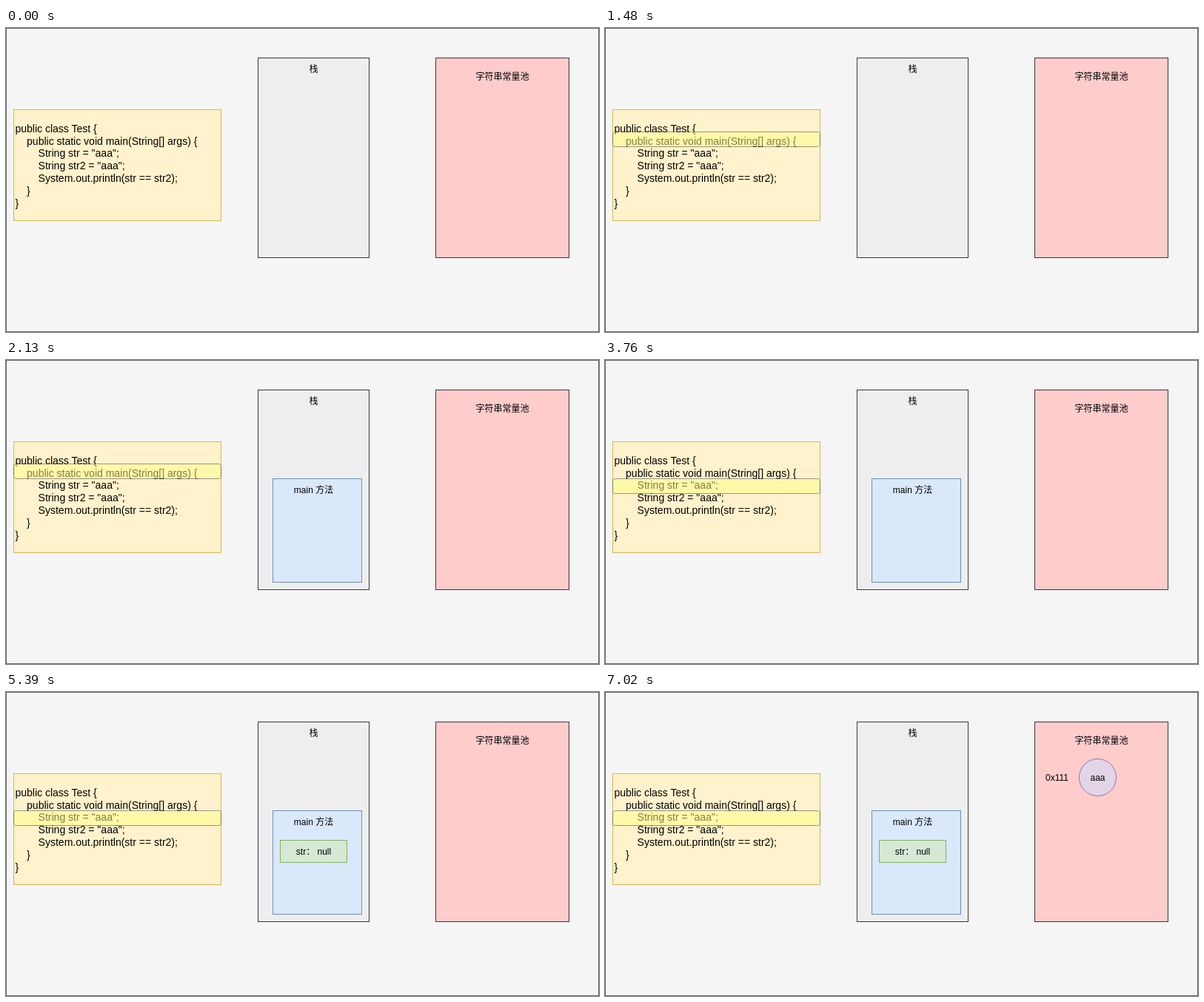
Write an HTML page that moves like this. It is 801 px wide and 411 px high and loops after 8 s.

```html
<!DOCTYPE html>
<html lang="zh-CN">
<head>
<meta charset="utf-8">
<style>
html, body { margin: 0; width: 100%; height: 100%; overflow: hidden; background: #f5f5f5; }
svg { display: block; }
text { font: 12px "Liberation Sans", Arial, "Noto Sans CJK SC", "Noto Sans CJK", sans-serif; text-anchor: middle; }
#code text { font-size: 14px; text-anchor: start; white-space: pre; }
</style>
</head>
<body>
<svg width="801" height="411">
  <rect x=".5" y=".5" width="800" height="410" fill="#f5f5f5" stroke="#666"/>
  <rect x="340.5" y="40.5" width="150" height="270" fill="#eee" stroke="#36393d"/>
  <text x="415.5" y="60">栈</text>
  <rect x="580.5" y="40.5" width="180" height="270" fill="#fcc" stroke="#36393d"/>
  <text x="670.5" y="70">字符串常量池</text>
  <rect x="10.5" y="110.5" width="280" height="150" fill="#fff2cc" stroke="#d6b656"/>
  <g id="code"></g>
  <rect id="marker" x="10.5" width="280" height="20" rx="3" fill="#ff8" stroke="#36393d" opacity=".5"/>
  <g id="method">
    <rect x="360.5" y="160.5" width="120" height="140" fill="#dae8fc" stroke="#6c8ebf"/>
    <text x="415.5" y="180">main 方法</text>
  </g>
  <g id="variable">
    <rect x="370.5" y="200.5" width="90" height="30" fill="#d5e8d4" stroke="#82b366"/>
    <text x="415.5" y="220">str： null</text>
  </g>
  <g id="pooled">
    <text x="610.5" y="120">0x111</text>
    <circle cx="665.5" cy="115.5" r="25" fill="#e1d5e7" stroke="#9673a6"/>
    <text x="665.5" y="120">aaa</text>
  </g>
</svg>
<script>
const LOOP = 8000, START = 500, STEP = 1630;
const $ = id => document.getElementById(id);

const lines = [
  'public class Test {',
  '    public static void main(String[] args) {',
  '        String str = "aaa";',
  '        String str2 = "aaa";',
  '        System.out.println(str == str2);',
  '    }',
  '}'
];
lines.forEach((line, i) => {
  const t = document.createElementNS('http://www.w3.org/2000/svg', 'text');
  t.setAttribute('x', 12.5);
  t.setAttribute('y', Math.floor(141.2 + 16.8 * i));
  t.textContent = line;
  $('code').append(t);
});

const show = (id, on) => $(id).style.display = on ? '' : 'none';

function draw(now) {
  const step = Math.floor((now % LOOP - START) / STEP); // -1 before the first step
  show('marker', step >= 0);
  $('marker').setAttribute('y', step < 2 ? 140.5 : 160.5);
  show('method', step >= 1);
  show('variable', step >= 3);
  show('pooled', step >= 4);
}

const start = performance.now();
function tick() {
  draw(performance.now() - start);
  requestAnimationFrame(tick);
}
tick();
</script>
</body>
</html>
```
